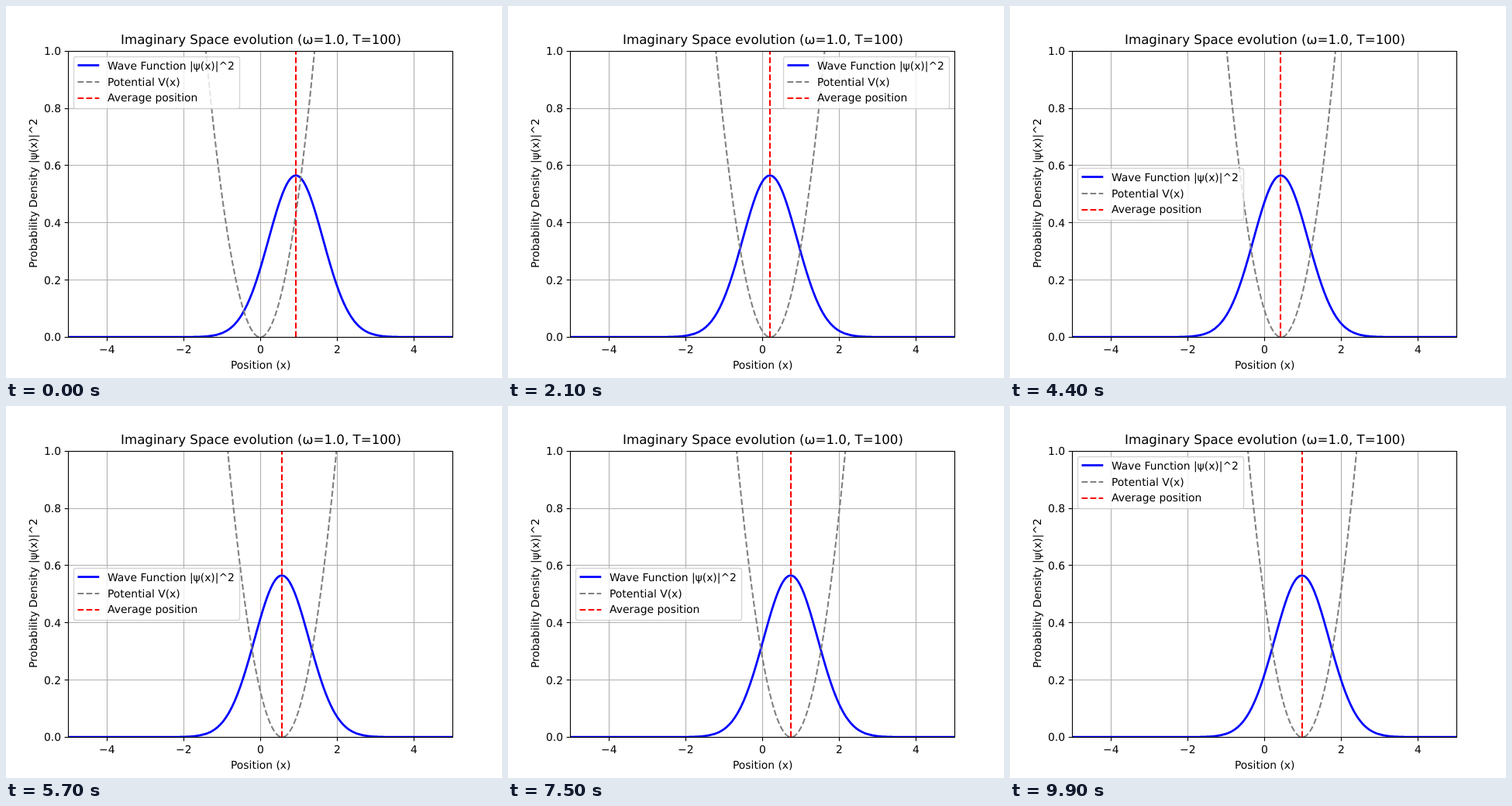
Recreate the animation shown at these times as an HTML page with a canvas. Size 640 by 480 pixels, loop 10 s.

```html
<!DOCTYPE html>
<html lang="en">
<head>
<meta charset="utf-8">
<title>Imaginary Space evolution</title>
<style>
html, body { margin: 0; width: 100%; height: 100%; overflow: hidden; background: #fff; }
canvas { display: block; }
</style>
</head>
<body>
<canvas id="plot" width="640" height="480"></canvas>
<script>
const ctx = document.getElementById('plot').getContext('2d');

const STEP = 100, STEPS = 100;      // ms per step, steps per loop
const FONT = '"DejaVu Sans", sans-serif';
const PT = 100 / 72;                // pixels per point
const EM = 10 * PT;
const BOX = { l: 80, t: 57.6, r: 576, b: 427.2 };
const LEGEND_W = 214, LEGEND_H = 67;

const px = x => BOX.l + (x + 5) * (BOX.r - BOX.l) / 10;
const py = y => BOX.b - y * (BOX.b - BOX.t);
const snap = v => Math.round(v) + 0.5;
const dash = w => [3.7 * w, 1.6 * w];

// The packet relaxes towards the moving minimum of the potential.
const START = 0.927, DECAY = 0.48, DRIFT = 1 / STEPS;
const LAG = DRIFT * DECAY / (1 - DECAY);
const minimum = n => n * DRIFT;
const mean = n => minimum(n) - LAG + (START + LAG) * DECAY ** n;

function line(points, color, width, pattern = []) {
  ctx.beginPath();
  for (const [x, y] of points) ctx.lineTo(x, y);
  ctx.strokeStyle = color;
  ctx.lineWidth = width;
  ctx.setLineDash(pattern);
  ctx.stroke();
  ctx.setLineDash([]);
}

function curve(f, from, to) {
  const points = [], count = 500;
  for (let i = 0; i <= count; i++) {
    const x = from + (to - from) * i / count;
    points.push([px(x), py(f(x))]);
  }
  return points;
}

// align: 0 = left, 0.5 = centre, 1 = right
function label(text, x, y, align = 0, size = EM) {
  ctx.font = size + 'px ' + FONT;
  ctx.fillStyle = '#000';
  const w = ctx.measureText(text).width - 1;
  ctx.fillText(text, Math.round(x - align * w), y);
}

function grid() {
  for (let x = -4; x <= 4; x += 2) {
    const gx = snap(px(x));
    line([[gx, 58], [gx, 428]], '#b0b0b0', 0.8 * PT);
  }
  for (let i = 0; i <= 5; i++) {
    const gy = snap(py(i / 5));
    line([[80, gy], [576, gy]], '#b0b0b0', 0.8 * PT);
  }
}

function curves(n) {
  const c = minimum(n), m = mean(n);
  ctx.save();
  ctx.beginPath();
  ctx.rect(80, 58, 497, 370);
  ctx.clip();
  ctx.lineJoin = 'round';
  line(curve(x => Math.exp(-((x - m) ** 2)) / Math.sqrt(Math.PI), -5, 5), '#00f', 2 * PT);
  // dashes start where the parabola enters the picture
  const reach = Math.sqrt(2 * (BOX.b + 1) / (BOX.b - BOX.t));
  line(curve(x => (x - c) ** 2 / 2, c - reach, c + reach), '#808080', 1.5 * PT, dash(1.5 * PT));
  const mx = Math.round(px(m));
  line([[mx, BOX.b], [mx, BOX.t]], '#f00', 1.5 * PT, dash(1.5 * PT));
  ctx.restore();
}

function axes() {
  const w = 0.8 * PT, tick = 3.5 * PT;
  for (let x = -4; x <= 4; x += 2) {
    const tx = snap(px(x));
    line([[tx, 427.5], [tx, 427.5 + tick]], '#000', w);
    label(String(x).replace('-', '\u2212'), px(x), 448, 0.5);
  }
  for (let i = 0; i <= 5; i++) {
    const y = py(i / 5), ty = snap(y);
    line([[80.5, ty], [80.5 - tick, ty]], '#000', w);
    label((i / 5).toFixed(1), 70.28, Math.round(y + 5.27), 1);
  }
  ctx.strokeStyle = '#000';
  ctx.lineWidth = w;
  ctx.strokeRect(80.5, 58.5, 496, 369);

  label('Imaginary Space evolution (ω=1.0, T=100)', 328, 49, 0.5, 12 * PT);
  label('Position (x)', 328, 468, 0.5);
  ctx.save();
  ctx.translate(40, 242);
  ctx.rotate(-Math.PI / 2);
  label('Probability Density |ψ(x)|^2', 0, 0, 0.5);
  ctx.restore();
}

// The legend hops to whichever spot is least crowded.
function legendSpot(n) {
  if (n === 0 || n >= 86) return [87, 65];
  return n < 41 ? [355, 65] : [87, 209];
}

function legend(n) {
  const [x, y] = legendSpot(n);
  ctx.beginPath();
  ctx.roundRect(x + 0.5, y + 0.5, LEGEND_W, LEGEND_H, 0.2 * EM);
  ctx.fillStyle = 'rgba(255,255,255,0.8)';
  ctx.fill();
  ctx.strokeStyle = 'rgba(204,204,204,0.8)';
  ctx.lineWidth = PT;
  ctx.stroke();

  const hx = x + 5.5, tx = x + 44.4;
  const key = (dy, color, width, pattern) =>
    line([[hx, y + dy], [hx + 2 * EM, y + dy]], color, width, pattern);
  key(11.5, '#00f', 2 * PT);
  key(33, '#808080', 1.5 * PT, dash(1.5 * PT));
  key(54, '#f00', 1.5 * PT, dash(1.5 * PT));
  label('Wave Function |ψ(x)|^2', tx, y + 17);
  label('Potential V(x)', tx, y + 38);
  label('Average position', tx, y + 58);
}

function draw(n) {
  ctx.textRendering = 'geometricPrecision';
  ctx.fillStyle = '#fff';
  ctx.fillRect(0, 0, 640, 480);
  grid();
  curves(n);
  axes();
  legend(n);
}

let shown = -1;
function tick(now) {
  const n = Math.floor(now / STEP) % STEPS;
  if (n !== shown) draw(shown = n);
  requestAnimationFrame(tick);
}
draw(0);
requestAnimationFrame(tick);
</script>
</body>
</html>
```
